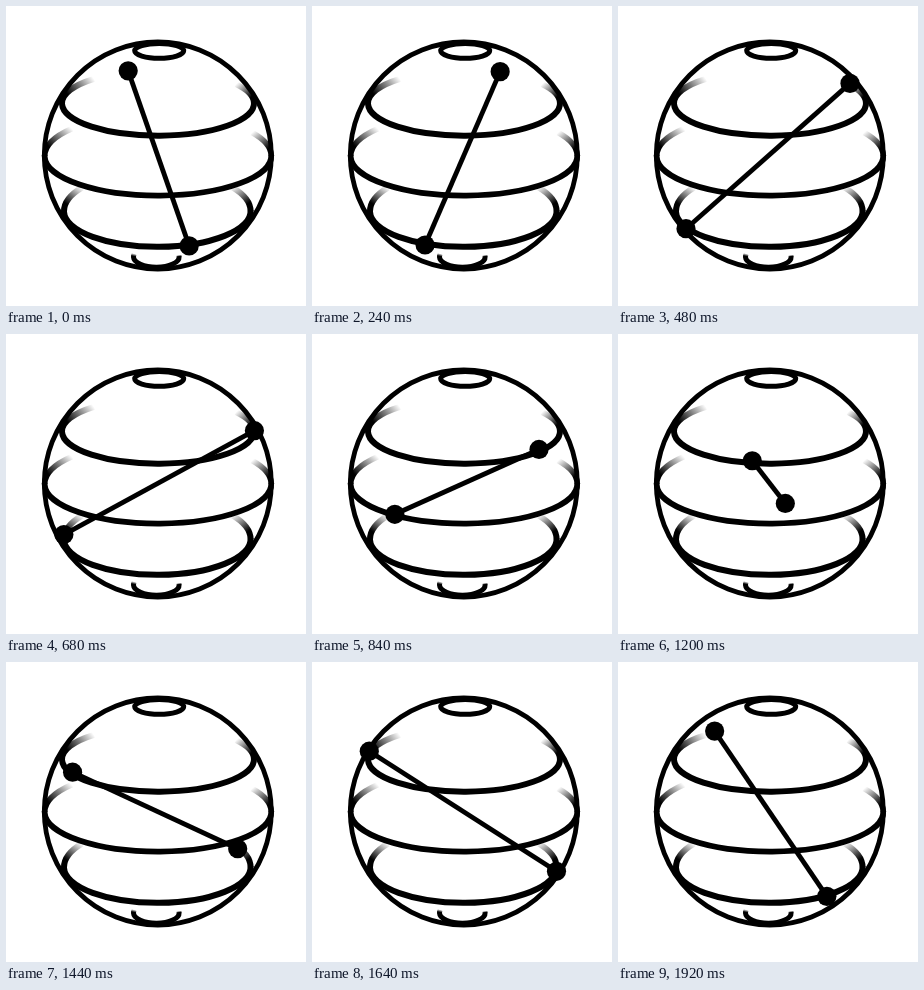
An HTML page with a canvas for the animation above (2 s loop, 300 by 300 pixels).

```html
<!DOCTYPE html>
<html lang="en">
<head>
<meta charset="utf-8">
<title>Spinning axis in a sphere</title>
<style>
  html, body { margin: 0; width: 100%; height: 100%; overflow: hidden; background: #fff; }
  canvas { display: block; width: 300px; height: 300px; }
</style>
</head>
<body>
<canvas id="stage" width="300" height="300"></canvas>
<script>
const ctx = document.getElementById('stage').getContext('2d');
const LOOP = 2000;
const INK = '#000';

// Moments at which the pose changes, in units of 40 ms
const ticks = [0, 2, 3, 5, 6, 8, 10, 12, 13, 16, 17, 18, 19, 21, 24,
  26, 27, 29, 30, 32, 33, 35, 36, 38, 39, 41, 43, 44, 46, 48];

// Orbit angles in degrees at the given pose indices
const poses = [0, 4, 7, 13, 18, 25, 29, 30];
const upper = { cx: 152, cy: 95.3, rx: 96.5, ry: -32,
  turn: [-18, 22, 56, 129, 190.6, 281, 325, 342] };
const lower = { cx: 151, cy: 205.5, rx: -94, ry: 36.6,
  turn: [-20, 23.8, 62, 133.5, 190, 276, 322, 340] };

// Latitude rings: front and back depth, and the x of both faded tips
const rings = [
  { cx: 152, cy: 97.4, rx: 96, front: 32.3, back: 33, left: 88, right: 230, width: 6 },
  { cx: 152, cy: 150, rx: 113.3, front: 39.6, back: 42, left: 66, right: 246, width: 5.7 },
  { cx: 151.3, cy: 205.2, rx: 93.3, front: 35.6, back: 40, left: 76, right: 226, width: 6 },
  { cx: 150.3, cy: 251, rx: 22.8, front: 10.2, back: 13, left: 128.3, right: 172.8, width: 5 }
];

function oval(cx, cy, rx, ry, width, from = 0, to = 2 * Math.PI, style = INK) {
  ctx.beginPath();
  ctx.ellipse(cx, cy, rx, ry, 0, from, to);
  ctx.lineWidth = width;
  ctx.strokeStyle = style;
  ctx.stroke();
}

// Gradient from a clear tip towards the solid side of a ring
function fade(tipX, tipY, sideX, sideY) {
  const g = ctx.createLinearGradient(tipX, tipY, sideX, sideY);
  g.addColorStop(0, 'rgba(0,0,0,0)');
  g.addColorStop(0.75, INK);
  return g;
}

function drawRing({ cx, cy, rx, front, back, left, right, width }) {
  oval(cx, cy, rx, front, width, -0.02, Math.PI + 0.02);
  for (const [tip, side] of [[left, Math.PI], [right, 0]]) {
    const angle = -Math.acos((tip - cx) / rx);
    const tipY = cy + back * Math.sin(angle);
    const style = fade(tip, tipY, cx + rx * Math.cos(side), cy);
    oval(cx, cy, rx, back, width, side ? -side : angle, side ? angle : 0, style);
  }
}

function place({ cx, cy, rx, ry, turn }, index) {
  let k = 0;
  while (index >= poses[k + 1]) k++;
  const part = (index - poses[k]) / (poses[k + 1] - poses[k]);
  const angle = (turn[k] + (turn[k + 1] - turn[k]) * part) * Math.PI / 180;
  return [cx + rx * Math.sin(angle), cy + ry * Math.cos(angle)];
}

function drawAxis(index) {
  const ends = [place(upper, index), place(lower, index)];
  ctx.beginPath();
  ends.forEach(p => ctx.lineTo(...p));
  ctx.lineWidth = 4.8;
  ctx.strokeStyle = ctx.fillStyle = INK;
  ctx.stroke();
  for (const [x, y] of ends) {
    ctx.beginPath();
    ctx.arc(x, y, 9.6, 0, 2 * Math.PI);
    ctx.fill();
  }
}

function draw(time) {
  const tick = (time % LOOP) / 40;
  const index = ticks.filter(t => t <= tick).length - 1;
  ctx.fillStyle = '#fff';
  ctx.fillRect(0, 0, 300, 300);
  oval(151.8, 149.5, 113.5, 113.5, 4.8);
  oval(153.2, 44.8, 24.5, 7.4, 5);
  rings.forEach(drawRing);
  drawAxis(index);
}

const start = performance.now();
function loop() {
  draw(performance.now() - start);
  requestAnimationFrame(loop);
}
loop();
</script>
</body>
</html>
```
